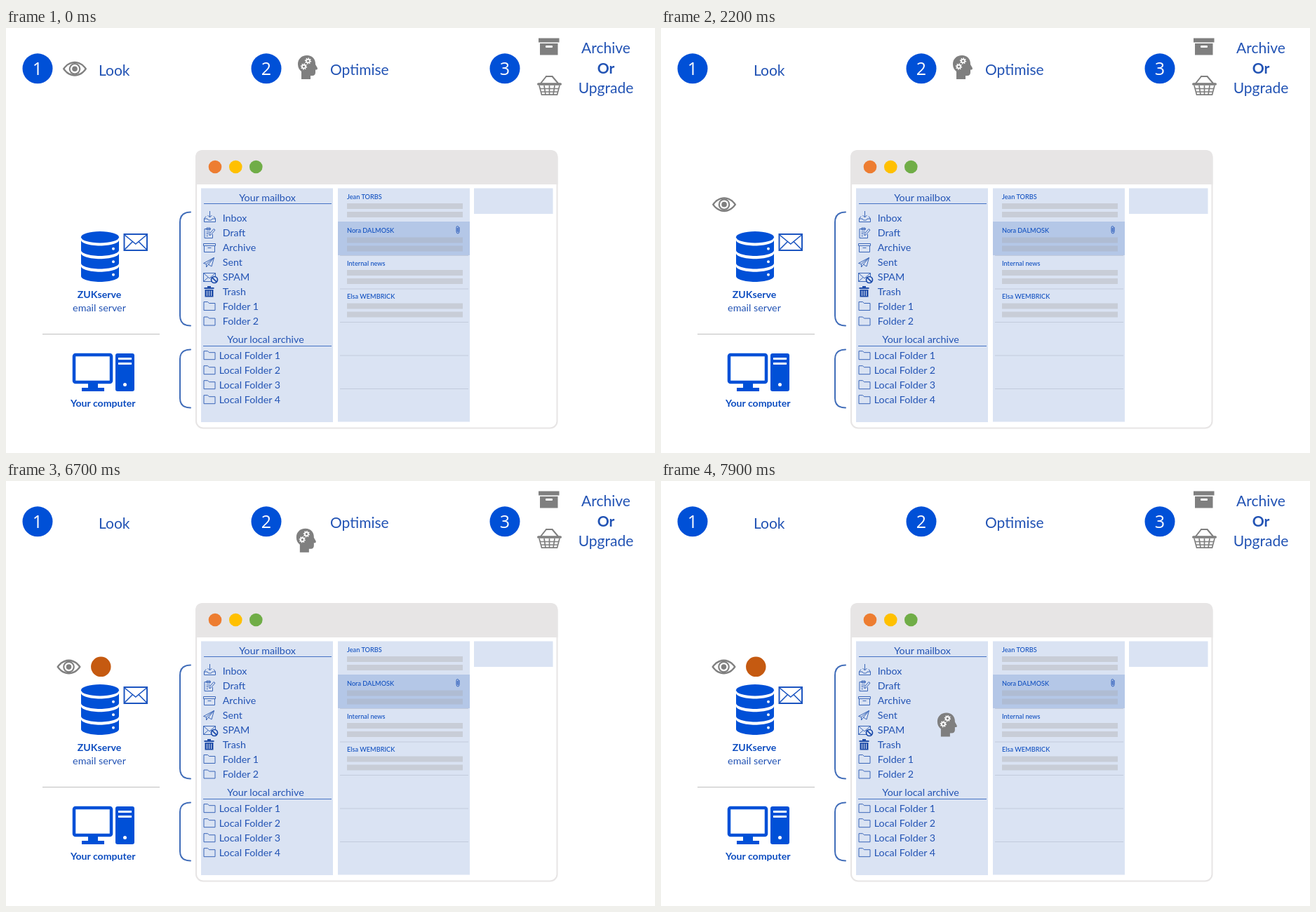
These frames come from a looping animation (925x606 px, 8000 ms). An HTML page:

```html
<!DOCTYPE html>
<html lang="en">
<head>
<meta charset="utf-8">
<title>Mailbox space</title>
<style>
  html, body { margin: 0; width: 100%; height: 100%; overflow: hidden; background: #fff; }
  svg { display: block; }
  text { font-family: Lato, "Open Sans", sans-serif; fill: #2253b4; }
  .step { font: 25px "Open Sans", "Noto Sans", sans-serif; fill: #fff; text-anchor: middle; }
  .title { font-size: 21px; }
  .item { font-size: 14.3px; }
  .mail { font-size: 9.2px; font-weight: 500; fill: #0f4fc0; }
  .mid { text-anchor: middle; }
  .bold { font-weight: 700; }
  .strong { font-size: 14.1px; font-weight: 700; fill: #0d4dc0; text-anchor: middle; }
  .blue { fill: #0050d7; }
  .gray { fill: #7f7f7f; }
  .white { fill: #fff; }
  .pale { fill: #dae3f3; }
  .line { fill: none; stroke: #3a66b8; stroke-width: 1; stroke-linejoin: round; }
  .rule { stroke: #4472c4; stroke-width: 1.2; }
  .bracket { fill: none; stroke: #416db9; stroke-width: 2; stroke-linecap: round; }
</style>
</head>
<body>
<svg width="925" height="606" viewBox="0 0 925 606">
  <defs>
    <path id="folder" class="line" d="M.5 12.5V.5H6L8 2.5H16.5V12.5Z"/>
    <g id="gear">
      <circle r="3.3" class="white"/>
      <circle r="3.7" fill="none" stroke="#fff" stroke-width="1.9" pathLength="16" stroke-dasharray="1 1"/>
      <circle r="1.6" class="gray"/>
    </g>
  </defs>

  <!-- steps -->
  <g id="steps"></g>
  <text class="title" x="132" y="67.5">Look</text>
  <text class="title" x="462" y="66.5">Optimise</text>
  <text class="title mid" x="855" y="36">Archive</text>
  <text class="title mid bold" x="855" y="65">Or</text>
  <text class="title mid" x="855" y="93">Upgrade</text>

  <g class="gray">
    <path d="M759 14.5h29.5v6H759zM761 22h25.500v16.500h-25.500z"/>
    <rect class="white" x="769" y="25" width="10" height="3" rx="1"/>
  </g>
  <g fill="none" stroke="#7f7f7f">
    <path stroke-width="2" d="M762 79L770 69M787 79L778.500 69M769 69h10.500"/>
    <path stroke-width="3.600" stroke-linecap="round" d="M758.800 80h31.400"/>
    <path stroke-width="1.700" d="M760 82L763.500 95.200H785.500L789 82M767 82L769 95M774.500 82V95M782 82L780 95M761 86.500H788M762 91H787"/>
  </g>

  <!-- servers -->
  <g class="blue">
    <g transform="translate(107 290) scale(.964 1.03)">
      <ellipse cx="28" cy="8" rx="28" ry="8"/>
      <g id="slabs"></g>
    </g>
    <rect x="97" y="466" width="53" height="39" rx="2" fill="#fff" stroke="#0050d7" stroke-width="4.500"/>
    <path d="M117 506h14v7h9v5h-32v-5h9z"/>
    <rect x="156" y="464" width="27" height="54" rx="3"/>
    <g class="white">
      <path d="M160 470h19v3h-19zM160 477h19v3h-19z"/>
      <circle cx="169.500" cy="508.500" r="2.500"/>
    </g>
  </g>
  <g fill="none" stroke="#1c55c0" stroke-width="2">
    <path d="M168.500 294H201V317H168.500Z"/>
    <path stroke-width="1.600" d="M169 295L184.800 308L200.500 295M169 316L180 305M200.500 316L189.500 305"/>
  </g>
  <text class="strong" x="133" y="385">ZUKserve</text>
  <text class="item mid" x="133" y="403.500">email server</text>
  <text class="strong" x="138.200" y="540">Your computer</text>
  <path d="M52 436.500H219" stroke="#bfbfbf"/>
  <path class="bracket" d="M263 262.500Q248 262.500 248 277V410Q248 424.500 263 424.500"/>
  <path class="bracket" d="M263 458.500Q248 458.500 248 472V528Q248 541.500 263 541.500"/>

  <!-- window -->
  <rect x="271" y="175" width="514.500" height="395.500" rx="10" fill="#fff" stroke="#e7e5e5" stroke-width="2"/>
  <path d="M270 223V185Q270 174 281 174H775.500Q786.500 174 786.500 185V223Z" fill="#e7e5e5"/>
  <circle cx="298" cy="198" r="9.300" fill="#ed7d31"/>
  <circle cx="327.300" cy="198" r="9.300" fill="#ffc000"/>
  <circle cx="356.300" cy="198" r="9.300" fill="#70ad47"/>
  <g class="pale">
    <rect x="278" y="228.500" width="188" height="333.500"/>
    <rect x="473" y="228.500" width="188" height="333"/>
    <rect x="667" y="228.500" width="112.500" height="36.500"/>
  </g>
  <text class="item mid" x="372.500" y="247">Your mailbox</text>
  <text class="item mid" x="370" y="448.500">Your local archive</text>
  <path class="rule" d="M282 250.500H464M281 453.500H464"/>
  <g id="items"></g>

  <!-- folder icons -->
  <g class="line">
    <path d="M285 268.500L282.500 272V276.500H298.500V272L296 268.500M282.500 272H287L288.500 274H292.500L294 272H298.500M290.500 261V270M287.500 267L290.500 270L293.500 267"/>
    <path d="M294.500 294V299.500H283V286.500H292M286 285H291V288H286ZM285.500 291H291M285.500 293.500H289M285.500 296.500H288M290 296L290.500 293L296 286.500L298 288L292.500 294.500Z"/>
    <path d="M281.500 307.500H298.500V310.500H281.500ZM282.500 310.500V319.500H297.500V310.500M287.500 313.500H292.500"/>
    <path d="M281.500 335.500L296.500 327.500L293 340L288.500 337L285.500 341V336.500ZM285.500 336.500L296.500 327.500L288.500 337"/>
    <path d="M281.500 349.500H298.500V361.500H281.500ZM281.500 349.500L290 357L298.500 349.500M281.500 361.500L288 355.500M298.500 361.500L292 355.500"/>
  </g>
  <g fill="#dae3f3" stroke="#1747a8" stroke-width="1.700">
    <circle cx="297" cy="359" r="4.500"/>
    <path d="M293.800 355.800L300.200 362.200"/>
  </g>
  <path fill="#1f4ca8" d="M282.500 370H287V368H292V370H296.500V372H282.500ZM283.500 373H295.500V383.500H283.500Z"/>
  <path stroke="#dae3f3" d="M286.500 374.500V382M289.500 374.500V382M292.500 374.500V382"/>

  <!-- messages -->
  <rect x="473" y="276" width="188" height="48" fill="#b4c7e7"/>
  <g id="mails"></g>
  <path d="M646 284V290Q646 293 644 293Q642 293 642 290V284.500Q642 282.500 643.500 282.500Q645 282.500 645 284.500V289.500Q645 290.500 644 290.500Q643.300 290.500 643.300 289.500V285" fill="none" stroke="#2456b8" stroke-width=".9"/>

  <!-- moving parts -->
  <g id="pie"></g>
  <g id="eye">
    <path class="gray" d="M-17.200 0C-8 -14 8 -14 17.200 0C8 14 -8 14 -17.200 0Z"/>
    <path class="white" d="M-14.300 0C-7 -10.600 7 -10.600 14.300 0C7 10.600 -7 10.600 -14.300 0Z"/>
    <circle r="8.300" class="gray"/>
    <circle r="6.200" class="white"/>
    <circle r="3.800" class="gray"/>
  </g>
  <g id="head">
    <path class="gray" d="M13 0C5 0 0 5.500 0 12.500C0 17.500 2 20.500 5 23V34H18V29H20.500C23.500 29 25 27 25 24.500V20.500H26.800C28 20 28.300 18.800 27.600 17.600L25 13V12C25 5 20.500 0 13 0Z"/>
    <use href="#gear" x="14.500" y="8"/>
    <use href="#gear" x="8.500" y="16"/>
  </g>
</svg>

<script>
const $ = id => document.getElementById(id);
const LOOP = 8000, TICK = 100;

const label = (cls, x, y, s) => `<text class="${cls}" x="${x}" y="${y}">${s}</text>`;
const folder = y => `<use href="#folder" x="281.500" y="${y}"/>`;

$("steps").innerHTML = [45, 371, 711].map((x, i) =>
  `<circle class="blue" cx="${x}" cy="57.800" r="21.500"/>` + label("step", x, 66.8, i + 1)).join("");

$("slabs").innerHTML = [12, 30, 48].map(y =>
  `<path d="M28 ${y + 8}C12.600 ${y + 8} 0 ${y + 4.4} 0 ${y}v14c0 4.400 12.600 8 28 8s28-3.600 28-8V${y}C56 ${y + 4.4} 43.400 ${y + 8} 28 ${y + 8}z"/>` +
  `<circle class="white" cx="47.700" cy="${y + 12}" r="2"/>`).join("");

const folders = ["Inbox", "Draft", "Archive", "Sent", "SPAM", "Trash", "Folder 1", "Folder 2"];
let list = folders.map((s, i) => label("item", 308.7, 276.3 + i * 21, s)).join("");
list += folder(390) + folder(411.5);
for (let i = 0; i < 4; i++) {
  const y = 472.2 + i * 21;
  list += label("item", 303.8, y, "Local Folder " + (i + 1)) + folder(y - 12);
}
$("items").innerHTML = list;

const senders = ["Jean TORBS", "Nora DALMOSK", "Internal news", "Elsa WEMBRICK"];
let mails = senders.map((s, i) => {
  const y = 243.6 + i * 47.5 + (i === 1 ? 1 : 0);
  const bar = dy => `<rect x="486" y="${y + dy}" width="165" height="8" fill="${i === 1 ? "#afbcd3" : "#c8cdd7"}"/>`;
  return label("mail", 486, y, s) + bar(6.4) + bar(18.4);
}).join("");
for (let i = 0; i < 5; i++) {
  const y = 324.5 + i * 47.5;
  mails += `<path d="M476 ${y}H659" stroke="#c2cbdc"/>`;
}
$("mails").innerHTML = mails;

// Slow start and end, symmetrical about the middle.
function ease(u) {
  u = Math.min(1, Math.max(0, u));
  const p = 2.15, k = 2 ** (p - 1);
  return u < .5 ? k * u ** p : 1 - k * (1 - u) ** p;
}

function move(id, from, by, start, length, t) {
  const e = ease((t - start) / length);
  $(id).setAttribute("transform", `translate(${from[0] + by[0] * e} ${from[1] + by[1] * e})`);
}

function pie(part, color) {
  const x = 135.3, y = 264.8, r = 13.3, a = part * 2 * Math.PI;
  const wedge = part < 1
    ? `<path fill="${color}" d="M${x} ${y}V${y - r}A${r} ${r} 0 ${part > .5 ? 1 : 0} 1 ${x + r * Math.sin(a)} ${y - r * Math.cos(a)}Z"/>`
    : "";
  return `<circle cx="${x}" cy="${y}" r="${r}" fill="${part < 1 ? "#fff" : color}" stroke="${color}" stroke-width="1.900"/>` + wedge;
}

const levels = ["", pie(.25, "#3a7d2e"), pie(.75, "#bf9000"), pie(1, "#c55a11")];
let shown = 0;

function draw(now) {
  const t = Math.floor((now % LOOP) / TICK) * TICK;
  move("eye", [98, 58.3], [-8.5, 206.8], 660, 1910, t);
  move("head", [416, 39], [-22.4, 295.5], 6285, 1780, t);
  const level = t < 3200 ? 0 : t < 4200 ? 1 : t < 5200 ? 2 : 3;
  if (level !== shown) {
    $("pie").innerHTML = levels[level];
    shown = level;
  }
}

let begin;
function frame(now) {
  begin ??= now;
  draw(now - begin);
  requestAnimationFrame(frame);
}
draw(0);
requestAnimationFrame(frame);
</script>
</body>
</html>
```
